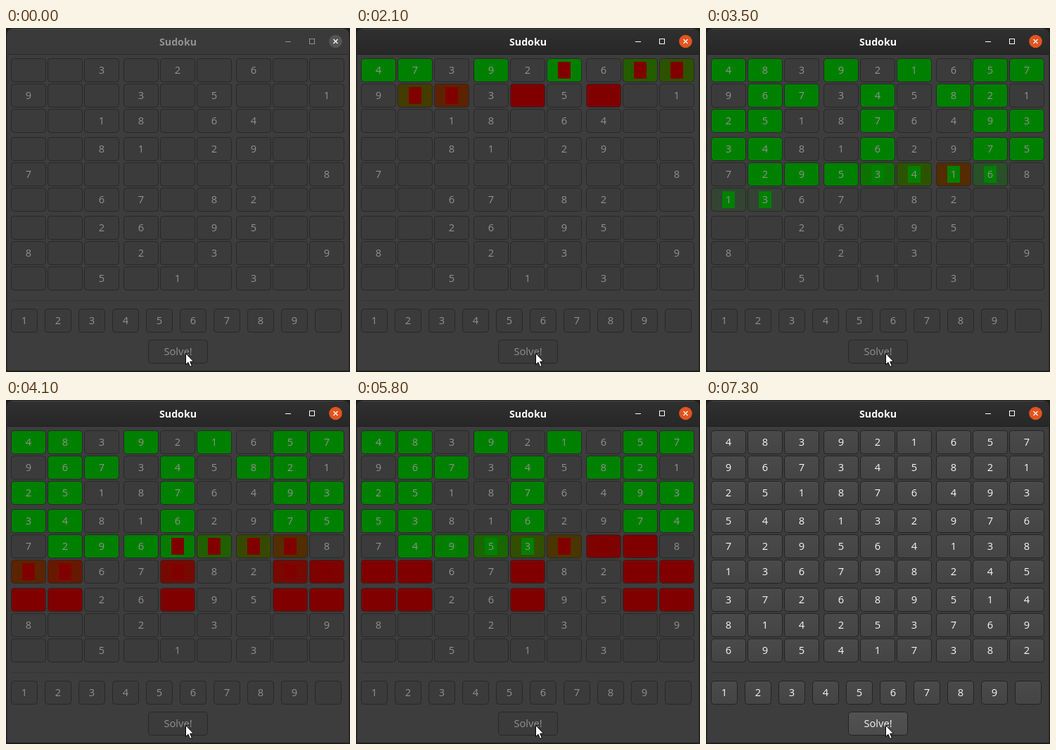
These frames come from a looping animation (489x489 px, 8 s). An HTML page with a canvas:

```html
<!DOCTYPE html>
<html lang="en">
<head>
<meta charset="utf-8">
<title>Sudoku</title>
<style>
  html, body { margin: 0; width: 100%; height: 100%; overflow: hidden; background: #1e1e1e; }
  canvas { display: block; }
</style>
</head>
<body>
<canvas id="stage" width="489" height="489"></canvas>
<script>
const g = document.getElementById('stage').getContext('2d');
const LOOP = 8000, FOCUS = 1200, DONE = 7300, TICK = 100, FADE = 200;
const GREY = [59, 59, 59], GREEN = [0, 128, 0], RED = [128, 0, 0];
const FONT = '14.67px "Open Sans", "Noto Sans", sans-serif';

const puzzle = [...('003020600900305001001806400' +
                    '008102900700000008006708200' +
                    '002609500800203009005010300')].map(Number);

// Backtracking search: every trial and every erasure is one step.
const grid = puzzle.slice();
const free = [...grid.keys()].filter(k => !grid[k]);
const steps = [];

const row = k => Math.floor(k / 9);
const col = k => k % 9;
const box = k => Math.floor(row(k) / 3) * 3 + Math.floor(col(k) / 3);
const related = (a, b) => row(a) === row(b) || col(a) === col(b) || box(a) === box(b);
const fits = (k, n) => !grid.some((v, j) => v === n && j !== k && related(j, k));

function put(cell, value, path) {
  grid[cell] = value;
  steps.push({ cell, value, path });
}

function solve(i, path) {
  if (i === free.length) return true;
  const k = free[i];
  for (let n = 1; n <= 9; n++) {
    put(k, n, path + n);
    if (fits(k, n) && solve(i + 1, path + n)) return true;
  }
  put(k, 0, path);
  return false;
}
solve(0, '');

// Pace: the search passes these partial fillings at these times.
const paths = steps.map(s => s.path);
const top3 = '4891576748225793';
const marks = [
  [2100, '479'],
  [2800, top3 + '3457629463'],
  [4100, top3 + '34675296'],
  [5200, top3 + '53674' + '2953416' + '14935' + '314'],
  [6600, top3 + '543762954'],
].map(([t, path]) => [t, paths.lastIndexOf(path)]);
marks.unshift([1150, 0]);
marks.push([DONE, steps.length - 1]);
for (let m = 1; m < marks.length; m++) {
  const [t0, s0] = marks[m - 1], [t1, s1] = marks[m];
  for (let s = s0; s <= s1; s++) steps[s].time = t0 + (t1 - t0) * (s - s0) / (s1 - s0);
}

const rgb = c => `rgb(${c.map(Math.round)})`;

function shade(c, t) {
  const p = Math.min(1, (t - c.start) / FADE);
  const e = 1 - (1 - p) ** 2;
  return c.from.map((v, i) => v + (c.to[i] - v) * e);
}

function boardAt(t) {
  const cells = puzzle.map(value => ({ value, from: GREY, to: GREY, start: 0 }));
  for (const s of steps) {
    if (s.time > t) break;
    const c = cells[s.cell], to = s.value ? GREEN : RED;
    c.value = s.value;
    if (to !== c.to) Object.assign(c, { from: shade(c, s.time), to, start: s.time });
  }
  return cells;
}

function text(s, x, y, color, font = FONT) {
  g.font = font;
  g.fillStyle = color;
  g.textAlign = 'center';
  g.fillText(s, x, y);
}

function rounded(x, y, w, h, r, fill, stroke) {
  g.beginPath();
  g.roundRect(x, y, w, h, r);
  g.fillStyle = fill;
  g.fill();
  if (stroke) {
    g.strokeStyle = stroke;
    g.lineWidth = 1;
    g.stroke();
  }
}

function vertical(y0, y1, a, b) {
  const v = g.createLinearGradient(0, y0, 0, y1);
  v.addColorStop(0, a);
  v.addColorStop(1, b);
  return v;
}

function button(x, y, w, label, live, fill, core) {
  rounded(x + .5, y + .5, w - 1, 33, 4, fill, live ? '#232323' : '#282828');
  if (core) {
    g.fillStyle = core;
    g.fillRect(x + w / 2 - 9, y + 5, 18, 24);
  }
  if (label) text(label, x + w / 2, y + 22, live ? '#f7f7f7' : '#919191');
}

function line(color, width, ...pts) {
  g.beginPath();
  pts.forEach(([x, y], i) => i % 2 ? g.lineTo(x, y) : g.moveTo(x, y));
  g.strokeStyle = color;
  g.lineWidth = width;
  g.stroke();
}

function frame(active) {
  g.fillStyle = '#1e1e1e';
  g.fillRect(0, 0, 489, 489);
  rounded(1.5, 1, 486, 486, [8, 8, 0, 0], '#3d3d3d');
  rounded(1.5, 1, 486, 37, [8, 8, 0, 0],
    active ? vertical(1, 38, '#303030', '#272727') : '#3a3a3a');
  line(active ? '#464646' : '#484848', 1, [9, 1.5], [480, 1.5]);
  line(active ? '#1f1f1f' : '#2a2a2a', 1, [2, 37.5], [487, 37.5]);

  const ink = active ? '#ffffff' : '#929292';
  text('Sudoku', 244.5, 25, ink, 'bold 14.2px "Open Sans", "Noto Sans", sans-serif');
  line(ink, 1, [397, 19.5], [405, 19.5]);
  g.strokeRect(431.5, 15.5, 7, 7);
  g.beginPath();
  g.arc(468.5, 19, 9.3, 0, 7);
  g.fillStyle = active ? '#e2541f' : '#555555';
  g.fill();
  line('#ffffff', 1.3, [465.5, 16], [471.5, 22], [471.5, 16], [465.5, 22]);
}

function cursor() {
  g.beginPath();
  [[255.5, 462.5], [255.5, 478.5], [259, 475.3], [261.7, 481.5], [264.3, 480.3],
   [261.7, 474.3], [266.5, 474]].forEach(([x, y]) => g.lineTo(x, y));
  g.closePath();
  g.fillStyle = '#ffffff';
  g.fill();
  g.strokeStyle = '#000000';
  g.lineWidth = 1;
  g.stroke();
}

function draw(t) {
  const live = t >= DONE;
  const face = y => live ? vertical(y, y + 34, '#4a4a4a', '#444444') : rgb(GREY);
  frame(t >= FOCUS);

  boardAt(t < FOCUS ? 0 : t).forEach((c, k) => {
    const x = 7 + 52 * col(k) + 4 * Math.floor(col(k) / 3);
    const y = 43 + 36 * row(k) + 4 * Math.floor(row(k) / 3);
    const tinted = !live && c.to !== GREY;
    button(x, y, 50, c.value || '', live,
      tinted ? rgb(shade(c, t)) : face(y), tinted && rgb(c.to));
  });

  line('#353535', 1, [7, 387.5], [481, 387.5]);
  for (let i = 0; i < 10; i++) button(7 + 48 * i, 399, 38, i < 9 ? i + 1 : '', live, face(399));
  button(202, 443, 85, 'Solve!', live, live ? vertical(443, 477, '#525252', '#4b4b4b') : face(443));
  cursor();
}

const begin = performance.now();
function loop() {
  const t = (performance.now() - begin) % LOOP;
  draw(Math.floor(t / TICK) * TICK);
  requestAnimationFrame(loop);
}
loop();
</script>
</body>
</html>
```
